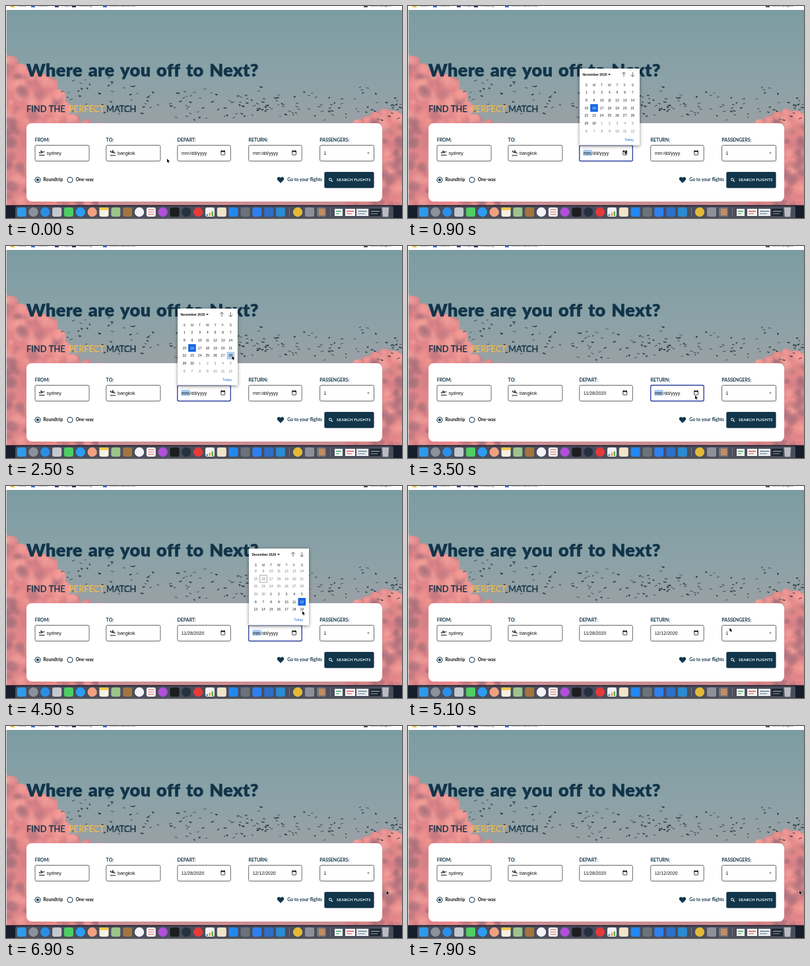
Animation of 600x322 px, one loop 8 s. Source, as an HTML page with a canvas:

```html
<!DOCTYPE html>
<html lang="en">
<head>
<meta charset="utf-8">
<title>Flight search</title>
<style>
html, body { margin: 0; width: 100%; height: 100%; overflow: hidden; }
canvas { display: block; width: 600px; height: 322px; }
</style>
</head>
<body>
<canvas></canvas>
<script>
const W = 600, H = 322, LOOP = 8000;
const NAVY = '#11354a', GOLD = '#f2b94f', INK = '#111';
const SANS = '"Liberation Sans", Arial, sans-serif';
const GEO = 'Lato, sans-serif';
const ratio = window.devicePixelRatio || 1;

function sized(canvas) {
  canvas.width = W * ratio;
  canvas.height = H * ratio;
  const context = canvas.getContext('2d');
  context.scale(ratio, ratio);
  return context;
}

const view = sized(document.querySelector('canvas'));
const page = document.createElement('canvas');
let c = sized(page);

function rect(x, y, w, h, fill) {
  c.fillStyle = fill;
  c.fillRect(x, y, w, h);
}

function round(x, y, w, h, r, fill, stroke, line = 1) {
  c.beginPath();
  c.roundRect(x, y, w, h, r);
  if (fill) { c.fillStyle = fill; c.fill(); }
  if (stroke) { c.strokeStyle = stroke; c.lineWidth = line; c.stroke(); }
}

function circle(x, y, r, fill, stroke, line = 1) {
  round(x - r, y - r, 2 * r, 2 * r, r, fill, stroke, line);
}

function shape(d, x, y, fill, stroke, line = 1) {
  const p = new Path2D(d);
  c.save();
  c.translate(x, y);
  if (stroke) { c.strokeStyle = stroke; c.lineWidth = line; c.stroke(p); }
  if (fill) { c.fillStyle = fill; c.fill(p); }
  c.restore();
}

function text(s, x, y, font, fill = INK, align = 'left', weight = 0) {
  c.font = font;
  c.fillStyle = c.strokeStyle = fill;
  c.textAlign = align;
  c.fillText(s, x, y);
  if (weight) { c.lineWidth = weight; c.strokeText(s, x, y); }
}

let seed = 11;
const rnd = () => (seed = seed * 16807 % 2147483647) / 2147483647;

function puff(x, y, r, color) {
  const g = c.createRadialGradient(x, y, 0, x, y, r);
  g.addColorStop(0, color + 'c0');
  g.addColorStop(0.5, color + '80');
  g.addColorStop(1, color + '00');
  c.fillStyle = g;
  c.fillRect(x - r, y - r, 2 * r, 2 * r);
}

// lobes run left to right as [x, top, radius]
function cloud(left, right, lobes) {
  const outline = new Path2D();
  outline.moveTo(left, 310);
  lobes.forEach(([x, y, r]) => outline.lineTo(x, y + r));
  outline.lineTo(right, 310);
  outline.closePath();
  lobes.forEach(([x, y, r]) => {
    outline.moveTo(x + r, y + r);
    outline.arc(x, y + r, r, 0, 7);
  });
  const tones = ['#f59d96', '#b4727c', '#ee8d8a', '#cf7c82', '#f3a29c', '#a06d79'];
  c.save();
  c.filter = 'blur(0.7px)';
  c.fillStyle = '#e0868a';
  c.fill(outline);
  c.filter = 'none';
  c.clip(outline);
  for (let i = 0; i < 260; i++) {
    puff(left + (right - left) * rnd(), 80 + 225 * rnd(), 5 + rnd() * 9, tones[i % tones.length]);
  }
  lobes.forEach(([x, y, r]) => puff(x, y + r * 0.7, r, '#f59f99'));
  c.restore();
}

function drawSky() {
  const sky = c.createLinearGradient(0, 6, 0, 303);
  sky.addColorStop(0, '#7c9ca2');
  sky.addColorStop(0.35, '#8ba2a7');
  sky.addColorStop(0.6, '#9ba0a5');
  sky.addColorStop(1, '#cf8f93');
  rect(0, 6, W, 297, sky);
  cloud(0, 140, [[0, 74, 9], [9, 76, 9], [22, 87, 10], [38, 97, 11], [55, 103, 12], [67, 108, 12],
    [79, 127, 12], [88, 145, 11], [102, 164, 10], [122, 172, 9], [140, 177, 8]]);
  cloud(515, 600, [[520, 180, 7], [533, 172, 8], [547, 167, 9], [560, 160, 9],
    [574, 156, 10], [588, 159, 10], [600, 163, 9]]);
}

function drawBirds() {
  c.strokeStyle = '#1c272e';
  for (let i = 0; i < 185; i++) {
    const x = 75 + 525 * Math.pow(rnd(), 0.85);
    const y = 130 + 22 * Math.min(1, (x - 75) / 230) + (rnd() + rnd() - 1) * 32;
    const s = 1 + rnd() * 1.4, tilt = (rnd() - 0.5) * 3;
    c.lineWidth = 0.7 + rnd() * 0.5;
    c.beginPath();
    c.moveTo(x - s, y - tilt);
    c.quadraticCurveTo(x - s * 0.3, y - 0.6, x, y + 0.5);
    c.quadraticCurveTo(x + s * 0.3, y - 0.6, x + s, y + tilt * 0.6);
    c.stroke();
  }
}

function drawBookmarks() {
  rect(0, 0, W, 6, '#fff');
  [[10, '#e8c21c'], [41, '#2c6fd8'], [77, '#5b2a86'], [103, '#3f2455'], [150, '#3567e0'], [545, '#555']]
    .forEach(([x, color]) => rect(x - 3, 0, 6, 2, color));
  [['tools', 18], ['notes', 48], ['maps', 84], ['reading', 110], ['travel ideas list', 157], ['other pages', 552]]
    .forEach(([s, x]) => text(s, x, 1.4, '6px ' + SANS, '#555'));
  rect(0, 6, 1, 297, '#d9dcdd');
}

function drawDock() {
  rect(0, 302.5, W, 19.5, '#161d2b');
  round(14, 304, 573, 20, 3, '#4a4d5c');
  const colors = ('#2f9be8 #8b929b #2b8fe6 #c3c9cf #4fce62 #2a9df2 #f0a184 #f4f1e2 #9cc48a #a3743f ' +
    '#f3f3f5 #f4f4f4 #b04fd8 #1d1d1f #26313f #e33a3a #f2f2f2 #f3e3c8 #2387f0 #6d7179 #2f80ee #2f6fc8 #2b8ad0').split(' ');
  const discs = [1, 2, 5, 6, 10, 12, 14, 15];
  colors.forEach((color, i) => {
    const x = 23.7 + i * 17.83;
    if (discs.includes(i)) circle(x, 313, 7.2, color);
    else round(x - 7, 306, 14, 14, 3, color);
  });
  // generic details on the note, list and chart tiles
  rect(141.5, 306, 14, 4, '#f0c94a');
  for (let i = 0; i < 3; i++) {
    rect(215.5, 309 + i * 3.5, 9, 0.9, '#d8605c');
    rect(303.5 + i * 4, 316 - i * 2, 2.5, 3 + i * 2, ['#3c9fe0', '#f0a030', '#55b84d'][i]);
  }
  rect(429, 306, 0.7, 14, '#8a8a94');
  circle(442, 313, 7.2, '#e4b93a');
  round(453, 306, 14, 14, 2, '#8d9098');
  round(471, 306, 14, 14, 2, '#73777d');
  rect(474, 308, 9, 10, '#c98a5c');
  rect(491, 306, 0.7, 14, '#8a8a94');
  [[498, 12, '#eef3ef', '#55a47a'], [514, 15, '#f5f2f2', '#d65d5d'],
   [531, 18, '#e8ebee', '#668694'], [551, 17, '#1d2833', '#8294a4']]
    .forEach(([x, w, fill, line]) => {
      rect(x, 308, w, 11, fill);
      rect(x + 2, 311, w - 4, 1.5, line);
      rect(x + 2, 315, w - 7, 1, line);
    });
  shape('M-5-7H5L4 7H-4Z', 575, 313, '#b9bcc2', '#8c8c92', 0.7);
}

function drawForm() {
  c.wordSpacing = '2px';
  c.letterSpacing = '0.4px';
  text('Where are you off to Next?', 31, 106.5, '900 27px ' + GEO, NAVY, 'left', 0.5);
  c.wordSpacing = c.letterSpacing = '0px';
  [['FIND THE', 31, NAVY], ['PERFECT', 95, GOLD], ['MATCH', 152, NAVY]]
    .forEach(([s, x, color]) => text(s, x, 161, '12.9px ' + GEO, color, 'left', 0.3));
  round(31, 178, 539, 119, 8, '#fff');
  ['FROM:', 'TO:', 'DEPART:', 'RETURN:', 'PASSENGERS:'].forEach((s, i) => {
    const x = 44 + i * 107.9;
    text(s, x - 0.3, 206.3, 'bold 7px ' + GEO, NAVY);
    round(x, 211.5, i === 2 || i === 3 ? 80.5 : 82, 24, 2, '#fff', '#50575c', 0.9);
  });
  const plane = 'M-4.5-1.2L-3.6-1.4-2.6-.6-.5-1.2-2.4-3.6-1.3-3.9 1.7-1.8 3.7-2.3Q4.7-2.4 4.5-1.5L-3.2.8Z';
  shape(plane, 54, 223.3, INK);
  c.save();
  c.translate(161.5, 222.5);
  c.rotate(0.55);
  shape(plane, 0, 0.5, INK);
  c.restore();
  rect(50, 226, 8.5, 1, INK);
  rect(157.5, 226.5, 8.5, 1, INK);
  text('sydney', 61.5, 225.5, '7px ' + SANS);
  text('bangkok', 169, 225.5, '7px ' + SANS);
  text('1', 481.5, 225.5, '7px ' + SANS);
  shape('M-2-1H2L0 1.2Z', 549, 223.5, '#777');
  circle(48, 264, 4, '#fff', NAVY, 1.1);
  circle(48, 264, 2.1, NAVY);
  circle(97, 264, 4, '#fff', NAVY, 1.1);
  text('Roundtrip', 56.5, 266.3, 'bold 6.7px ' + GEO);
  text('One-way', 105.7, 266.3, 'bold 6.7px ' + GEO);
  shape('M0 5L-4.4.5C-7-3-2.6-6.4 0-2.9C2.6-6.4 7-3 4.4.5Z', 416, 264, NAVY);
  text('Go to your flights', 426.3, 266.3, 'bold 6.8px ' + GEO, NAVY);
}

function drawButton(hover) {
  c.save();
  if (hover) {
    c.shadowColor = '#0005';
    c.shadowBlur = 3 * ratio;
    c.shadowOffsetY = ratio;
  }
  round(482.3, 252, 75.3, 24.5, 2, NAVY);
  c.restore();
  circle(491.4, 263.4, 1.9, null, '#fff', 1);
  shape('M1.5 1.5L3.4 3.4', 491.4, 263.4, null, '#fff', 1.2);
  c.letterSpacing = '0.2px';
  text('SEARCH FLIGHTS', 501, 266.4, 'bold 6px ' + GEO, hover ? GOLD : '#fff');
  c.letterSpacing = '0px';
}

function drawDate(x, value, focused) {
  if (focused) {
    round(x, 211.5, 80.5, 24, 2, '#fff', '#2c3f9c', 1.3);
    rect(x + 5.7, 218.5, 13, 9, '#a8cbf0');
  }
  if (value) text(value, x + 6, 225.5, '7px ' + SANS);
  else {
    text('mm', x + 6.3, 225.5, '7px ' + SANS);
    text('/dd/yyyy', x + 18.8, 225.5, '7px ' + SANS);
  }
  round(x + 66, 220.2, 5.8, 6, 0.6, '#fff', INK, 0.8);
  rect(x + 65.7, 220, 6.4, 1.6, INK);
  rect(x + 66.5, 219, 1, 1.2, INK);
  rect(x + 70.3, 219, 1, 1.2, INK);
}

function drawCalendar(x, { scroll = 0, hover, picked }) {
  const december = scroll > 7;
  c.save();
  c.shadowColor = '#0007';
  c.shadowBlur = 5 * ratio;
  c.shadowOffsetY = ratio;
  rect(x, 95, 91, 116.5, '#fff');
  c.restore();
  const title = december ? 'December 2020' : 'November 2020';
  text(title, x + 4.5, 106, 'bold 5px ' + SANS);
  shape('M-1.8-.9H1.8L0 1.2Z', x + 45, 104, INK);
  const arrow = 'M0 3.5V-3.5M-3-.5L0-3.5 3-.5';
  shape(arrow, x + 67, 104, null, '#444', 0.8);
  c.save();
  c.translate(x + 80.3, 104);
  c.scale(1, -1);
  shape(arrow, 0, 0, null, '#444', 0.8);
  c.restore();
  const colX = i => x + 10.3 + i * 11.67;
  [...'SMTWTFS'].forEach((s, i) => text(s, colX(i), 121.8, '5px ' + SANS, '#333', 'center'));
  c.save();
  c.beginPath();
  c.rect(x, 124, 91, 72.3);
  c.clip();
  // day 1 is Sunday, 1 November; days past 30 belong to December
  for (let day = 1; day <= 56; day++) {
    const cx = colX((day - 1) % 7);
    const cy = 131.6 + Math.floor((day - 1) / 7) * 11.65 - scroll;
    const cell = fill => rect(cx - 5.8, cy - 5.8, 11.6, 11.6, fill);
    const blue = picked ? day === picked : day === 16 && !december;
    if (blue) cell('#1567e0');
    else if (day === hover) cell('#b3cfee');
    else if (day === 16) round(cx - 5.4, cy - 5.4, 10.8, 10.8, 0, null, '#888', 0.7);
    const color = blue ? '#fff' : (day > 30) === december ? INK : '#777';
    text(day > 30 ? day - 30 : day, cx, cy + 1.8, '5px ' + SANS, color, 'center');
  }
  c.restore();
  text('Today', x + 68, 205, '5.3px ' + SANS, '#1a6fd8');
}

const path = [[0, 244, 232], [200, 244, 232], [750, 328.5, 219.5], [1300, 328.5, 219.5],
  [2300, 342.5, 167], [2700, 342.5, 167], [3300, 435, 227], [3700, 435, 227], [4200, 447, 176],
  [4500, 449, 190], [4700, 449, 190], [5600, 541, 251], [6400, 541, 251], [7200, 593, 250], [LOOP, 593, 250]];

function pointer(t) {
  const i = path.findIndex(p => p[0] > t);
  const [t0, x0, y0] = path[i - 1], [t1, x1, y1] = path[i];
  const u = (t - t0) / (t1 - t0), k = u * u * (3 - 2 * u);
  return [x0 + (x1 - x0) * k, y0 + (y1 - y0) * k];
}

function drawPointer(x, y, hand) {
  const d = hand
    ? 'M-.8.4Q0-.5.7.4V2.6L3.2 3.3Q3.8 4 3.2 6L2.6 7H-.8L-2.7 4.4Q-2.4 3.4-.8 4.3Z'
    : 'M0 0V5.6L1.3 4.4 2.2 6.5 3.1 6.1 2.2 4.1H4Z';
  shape(d, x, y, hand ? '#fff' : '#000', hand ? '#000' : '#fff', 0.9);
}

function frame(now) {
  const t = Math.floor(now % LOOP / 100) * 100;
  const [x, y] = pointer(t);
  const overButton = x > 482 && x < 558 && y > 250 && t > 5000;
  c.clearRect(0, 0, W, H);
  c.drawImage(page, 0, 0, W, H);
  drawDate(259.8, t >= 2700 && '11/28/2020', t >= 800 && t < 2700);
  drawDate(367.7, t >= 4600 && '12/12/2020', t >= 3400 && t < 4600);
  drawButton(overButton);
  if (t >= 800 && t < 2700) drawCalendar(260, { hover: t >= 2200 ? 28 : 0 });
  if (t >= 3600 && t < 4600) {
    const scroll = 14 * Math.min(1, Math.max(0, (t - 3800) / 300));
    drawCalendar(368, { scroll, picked: t >= 4300 ? 42 : 0 });
  }
  drawPointer(x, y, overButton);
  requestAnimationFrame(frame);
}

drawSky();
drawBirds();
drawBookmarks();
drawForm();
drawDock();
c = view;
requestAnimationFrame(frame);
</script>
</body>
</html>
```
